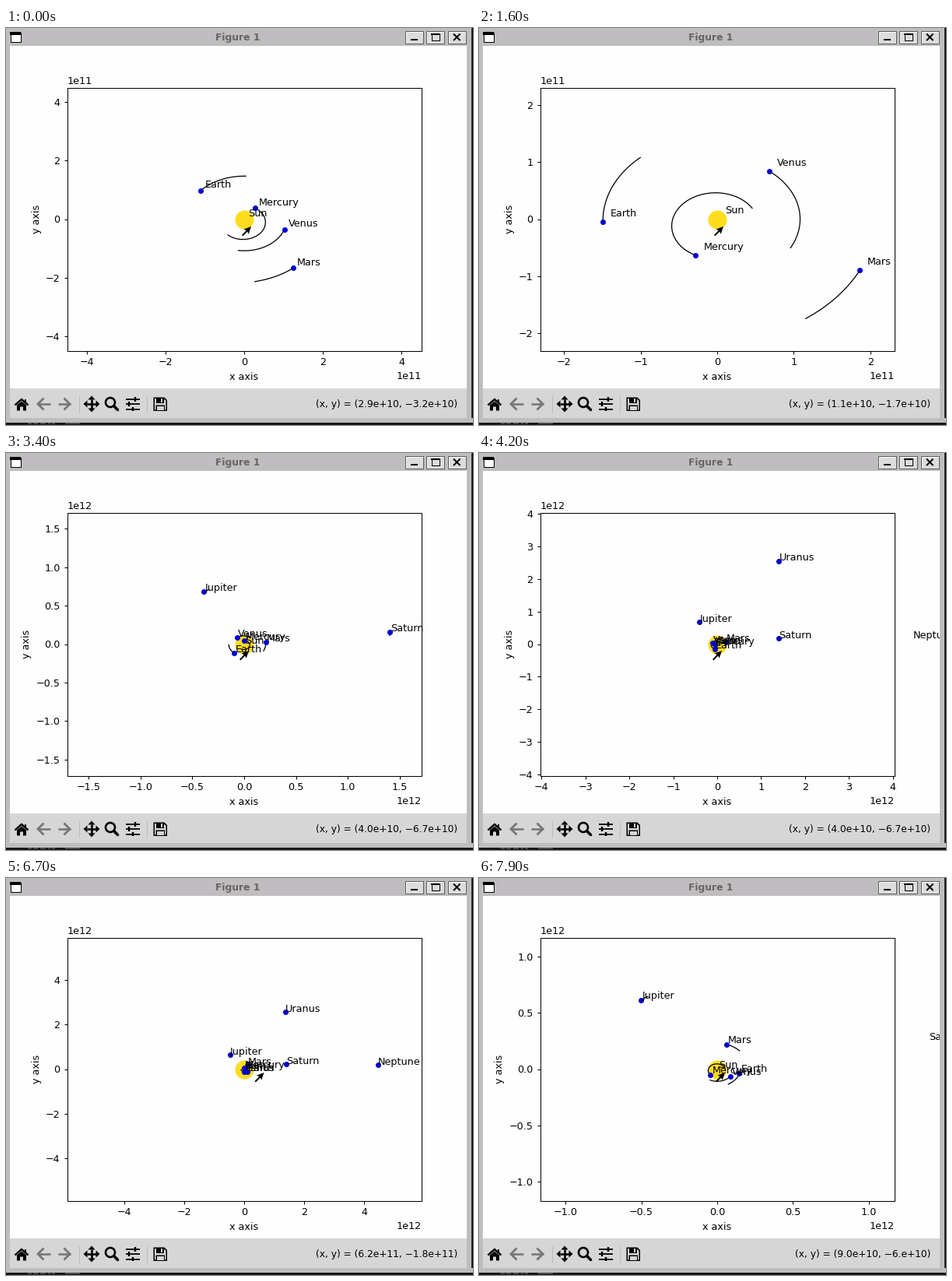
These frames come from a looping animation (600x510 px, 8000 ms). A matplotlib script:

```python
import numpy as np
import matplotlib.pyplot as plt
from matplotlib.animation import FuncAnimation
from matplotlib.patches import Circle, Polygon, Rectangle

W, H, DPI = 600, 510, 120
FRAMES, INTERVAL = 80, 100
PT = 72 / DPI
S = 0.917 * 100 / DPI  # the plot window is shown slightly reduced

plt.rcParams.update({
    "font.family": "DejaVu Sans",
    "font.size": 10 * S,
    "axes.linewidth": 0.8 * S,
    "axes.labelpad": 4 * S,
    **{f"{a}tick.major.{k}": v * S for a in "xy"
       for k, v in (("size", 3.5), ("pad", 3.5), ("width", 0.8))},
})

# name: semi-major axis (1e11 m), eccentricity, perihelion (deg),
# mean anomaly at start (deg), mean motion (deg per day)
PLANETS = {
    "Mercury": (0.579, 0.2056, 77.5, -15.5, 4.0923),
    "Venus": (1.082, 0.0, 0.0, -19.3, 1.602),
    "Earth": (1.496, 0.0167, 102.9, 34.2, 0.9856),
    "Mars": (2.279, 0.0934, 336.1, -24.4, 0.524),
    "Jupiter": (7.785, 0.0484, 14.3, 92.1, 0.0831),
    "Saturn": (14.1, 0.0, 0.0, 3.1, 0.0335),
    "Uranus": (29.06, 0.0, 0.0, 59.9, 0.0117),
    "Neptune": (44.6, 0.0, 0.0, 1.4, 0.006),
}
TRAIL_DAYS = 49
LABEL_SHIFT = 1e10
BASE_LIMIT, ZOOM_STEP = 4.502e11, 1.1

# frame at which a scroll level starts
ZOOM = {
    0: 0, 3: -1, 4: -3, 5: -4, 6: -6, 7: -7,
    25: -6, 26: -3, 27: 0, 28: 6, 29: 8,
    33: 12, 34: 14, 35: 16, 36: 18, 37: 19, 38: 20, 39: 21, 40: 22, 41: 23,
    43: 24, 44: 25, 45: 26, 46: 27,
    68: 26, 69: 25, 70: 24, 71: 23, 72: 21,
    73: 19, 74: 17, 75: 15, 76: 13, 77: 12, 78: 11, 79: 10,
}
READOUT = {
    0: "2.9e+10, −3.2e+10",
    8: "1.1e+10, −1.7e+10",
    31: "4.0e+10, −6.7e+10",
    60: "4.1e+11, −2.2e+11",
    61: "6.2e+11, −1.8e+11",
    71: "2.1e+11, −1.e+11",
    76: "9.0e+10, −6.e+10",
}
MOUSE = np.array([
    (0, 315, 255), (7, 315, 255), (8, 314, 255), (28, 314, 255),
    (31, 312, 254), (58, 312, 254), (61, 331.5, 250), (69, 331.5, 250),
    (72, 318, 251), (76, 316, 250),
])
ARROW = np.array([(0, 0), (-9.5, 3.5), (-6.3, 5), (-12, 11), (-10.6, 12.4),
                  (-4.8, 6.5), (-3.3, 9.7)])


def held(table, i):
    """Latest value whose start is not after i."""
    return table[max(k for k in table if k <= i)]


def day(i):
    return np.interp(i, [0, 16, 28, 79], [0, 43.7, 77.6, 213.7])


def orbit(planet, t):
    a, e, peri, m0, n = planet
    m = np.radians(m0 + n * t)
    ecc = m
    for _ in range(15):
        ecc = m + e * np.sin(ecc)
    u = a * 1e11 * (np.cos(ecc) - e)
    v = a * 1e11 * np.sqrt(1 - e * e) * np.sin(ecc)
    c, s = np.cos(np.radians(peri)), np.sin(np.radians(peri))
    return u * c - v * s, u * s + v * c


fig = plt.figure(figsize=(W / DPI, H / DPI), dpi=DPI, facecolor="#fefefe")

# Plot
ax = fig.add_axes([78.5 / W, 1 - 414.5 / H, 455 / W, 338 / H],
                  facecolor="#fefefe")
ax.set_xlabel("x axis")
ax.set_ylabel("y axis")
ax.plot(0, 0, "o", ms=24 * PT, mew=0, color="#ffdd1c", zorder=1.5)
ax.text(LABEL_SHIFT, LABEL_SHIFT, "Sun")
trails, dots, labels = {}, {}, {}
for name in PLANETS:
    trails[name], = ax.plot([], [], "k", lw=1.0 * S)
    dots[name], = ax.plot([], [], "o", ms=7 * PT, mew=0, color="#0000d0",
                          zorder=2.5)
    labels[name] = ax.text(0, 0, name)

# Window chrome, above the plot
ui = fig.add_axes([0, 0, 1, 1], zorder=5)
ui.set(xlim=(0, W), ylim=(H, 0))
ui.axis("off")


def box(x0, y0, x1, y1, fill, edge="none", lw=1):
    ui.add_patch(Rectangle((x0, y0), x1 - x0, y1 - y0, fc=fill, ec=edge,
                           lw=lw * PT, joinstyle="miter"))


def poly(*pts, color="black"):
    ui.add_patch(Polygon(pts, fc=color, ec="none"))


def line(*pts, lw=2, color="black", cap="butt"):
    ui.plot(*zip(*pts), color=color, lw=lw * PT, solid_capstyle=cap,
            solid_joinstyle="miter")


def frame():
    grey, dark = "#bfbdbf", "#181818"
    box(0, 0, W, 23, grey)
    box(0, 23, 5, 507, grey)
    box(592, 0, 598, 507, grey)
    box(598, 0, W, H, dark)
    box(0, 501, W, 507, grey)
    box(0, 507, W, H, dark)
    for x, w in ((28, 5), (35, 6), (44, 7), (54, 3), (59, 4), (76, 19)):
        box(x, 507, x + w, 509, "#4a4a4a")
    box(5, 463, 592, 501, "#d6d6d6")


def title_bar():
    ui.text(298, 11, "Figure 1", size=12.4 * PT, weight="bold",
            color="#666464", ha="center", va="center_baseline")
    box(5.5, 5.5, 18.5, 17.5, "white", "black")
    box(5, 5, 19, 9, "black")
    for x in (512.5, 539.5, 567.5):
        box(x, 3.5, x + 23.5, 19.5, "#dddbdd", "#5c5c5c")
        line((x + 1, 18.5), (x + 1, 4.5), (x + 22.5, 4.5), lw=1,
             color="white")
    line((520, 15), (529, 15))
    box(546.5, 7.5, 557, 15.5, "none", "black")
    line((546, 8), (557.5, 8))
    line((575, 7.5), (583.5, 16))
    line((583.5, 7.5), (575, 16))


def toolbar():
    # home
    line((11.5, 484.5), (20, 477), (28.5, 484.5), lw=2.4)
    poly((14, 484.5), (20, 479.5), (26, 484.5), (26, 491.5), (22, 491.5),
         (22, 486.5), (18, 486.5), (18, 491.5), (14, 491.5))
    box(24, 477, 26.3, 481, "black")
    # back and forward
    for x, d in ((39.5, 1), (83.5, -1)):
        line((x + d, 483), (x + 17 * d, 483), lw=2.6, color="#777777")
        line((x + 9 * d, 475.5), (x + 1.5 * d, 483), (x + 9 * d, 490.5),
             lw=2.8, color="#777777")
    for x in (93.5, 181):
        ui.plot([x, x], [473, 494], color="#a2a2a2", lw=PT,
                ls=(0, (1, 1)))
    # pan
    line((104, 483), (116, 483), lw=2.6)
    line((110, 477), (110, 489), lw=2.6)
    for dx, dy in ((1, 0), (-1, 0), (0, 1), (0, -1)):
        cx, cy = 110 + 5.5 * dx, 483 + 5.5 * dy
        poly((cx + 5 * dx, cy + 5 * dy), (cx + 4.6 * dy, cy + 4.6 * dx),
             (cx - 4.6 * dy, cy - 4.6 * dx))
    # zoom
    ui.add_patch(Circle((134, 481), 6, fc="none", ec="black", lw=2.6 * PT))
    line((138.5, 485.5), (143.5, 490.5), lw=3.6, cap="round")
    # subplots
    for y, knob in ((477, 166), (483, 157.5), (489.5, 163)):
        line((153.5, y), (171.5, y), lw=1.8)
        line((knob, y - 2.8), (knob, y + 2.8), lw=2.4)
    # save
    poly((189.5, 474.5), (203.5, 474.5), (207, 478), (207, 492),
         (189.5, 492))
    poly((191, 476), (193, 476), (193, 482), (203, 482), (203, 476.5),
         (205.5, 479), (205.5, 490.5), (204, 490.5), (204, 484.5),
         (192.5, 484.5), (192.5, 490.5), (191, 490.5), color="#d6d6d6")
    box(194, 486, 202.5, 490.5, "#d6d6d6")
    box(198.5, 476, 201, 480.5, "#d6d6d6")


frame()
title_bar()
toolbar()
readout = ui.text(580.5, 482.5, "", size=12.23 * PT, ha="right",
                  va="center_baseline")
cursor = Polygon(ARROW, fc="black", ec="none", zorder=6)
ui.add_patch(cursor)


def update(i):
    limit = BASE_LIMIT * ZOOM_STEP ** held(ZOOM, i)
    ax.set(xlim=(-limit, limit), ylim=(-limit, limit))
    now = day(i)
    days = np.linspace(now - TRAIL_DAYS, now, TRAIL_DAYS + 1)
    for name, planet in PLANETS.items():
        x, y = orbit(planet, days)
        trails[name].set_data(x, y)
        dots[name].set_data(x[-1:], y[-1:])
        labels[name].set_position((x[-1] + LABEL_SHIFT, y[-1] + LABEL_SHIFT))
    readout.set_text(f"(x, y) = ({held(READOUT, i)})")
    tip = [np.interp(i, MOUSE[:, 0], MOUSE[:, c]) for c in (1, 2)]
    cursor.set_xy(ARROW + tip)
    return []


anim = FuncAnimation(fig, update, frames=FRAMES, interval=INTERVAL,
                     init_func=lambda: [], repeat=True, repeat_delay=0)
plt.show()
```
